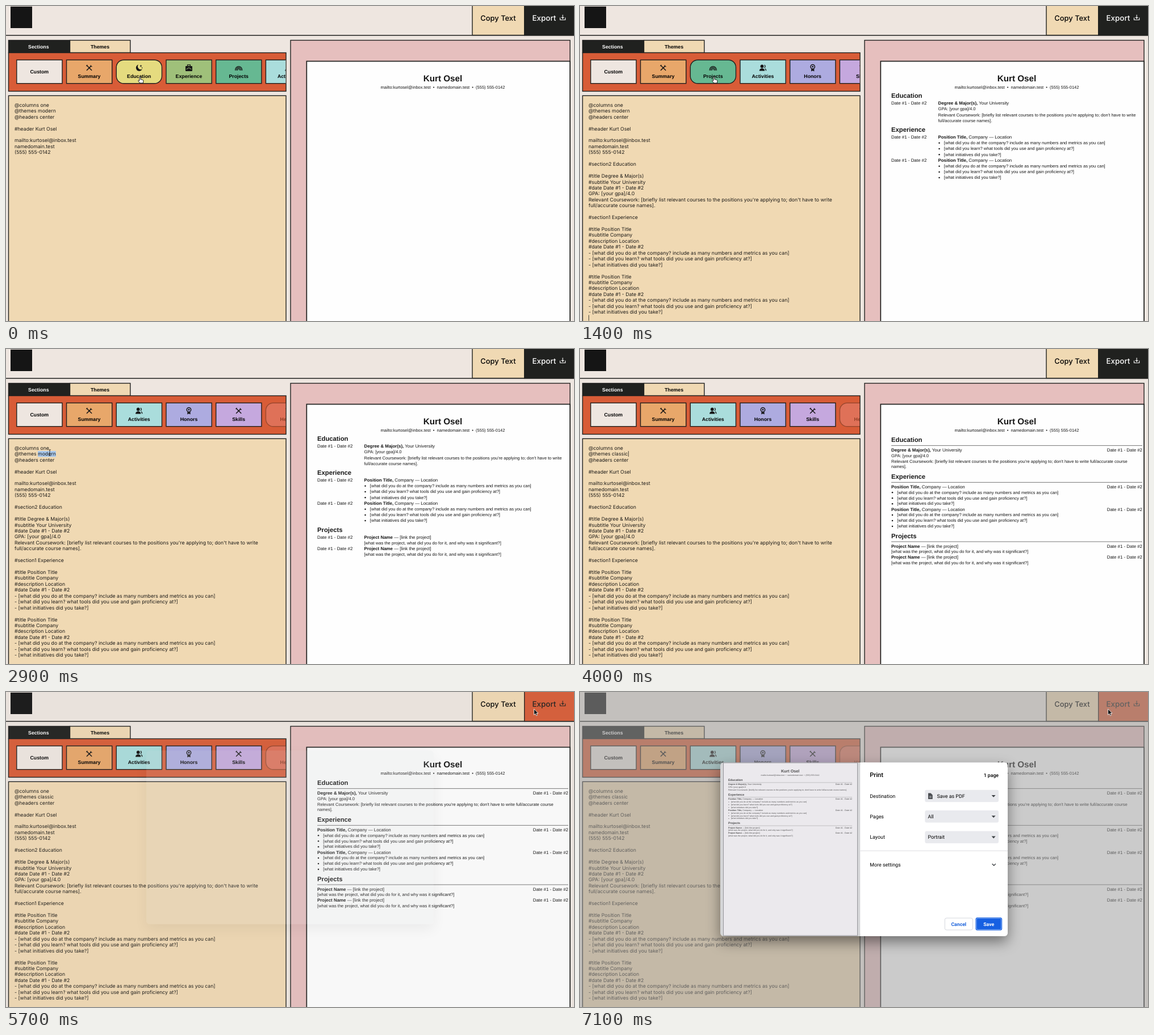
These frames come from a looping animation (1000 by 556 pixels, 7.2 s). An HTML page:

```html
<!DOCTYPE html>
<html lang="en">
<head>
<meta charset="utf-8">
<title>Resume builder</title>
<style>
html, body { margin: 0; width: 100%; height: 100%; overflow: hidden; background: #eee6e0; }
svg { display: block; width: 100vw; height: 100vh; }
text { text-rendering: geometricPrecision; white-space: pre; }
.sans { font-family: "Liberation Sans", Arial, sans-serif; }
.code { font-family: Inter, sans-serif; }
.ui { font-family: Roboto, sans-serif; }
.b { font-weight: 700; }
.m { font-weight: 500; }
</style>
</head>
<body>
<svg viewBox="0 0 1000 556" preserveAspectRatio="none">
  <defs>
    <clipPath id="barClip"><rect x="5" y="83" width="487.5" height="67"/></clipPath>
    <filter id="shadow" x="-20%" y="-20%" width="140%" height="150%">
      <feDropShadow dx="0" dy="10" stdDeviation="12" flood-opacity=".45"/>
    </filter>
  </defs>
  <g id="frame"></g>
  <g id="exportBtn"></g>
  <g id="cards" clip-path="url(#barClip)"></g>
  <g id="editor"></g>
  <g id="page"></g>
  <g id="dim"></g>
  <g id="dialog"></g>
  <g id="cursor"></g>
</svg>
<script>
const LOOP = 7200;
const INK = '#20211f', SAND = '#f0d9b3', ORANGE = '#d85c37', CREAM = '#eee6e0';
const NAME = 'Kurt Osel', MAIL = 'mailto:kurtosel@inbox.test', SITE = 'namedomain.test', PHONE = '(555) 555-0142';

// Moments of the story, in ms
const ADD = { Education: 600, Experience: 1150, Projects: 1750 };
const SELECT = 2700, TYPE = 3050, KEY = 100, CLICK = 5600, OPTIONS = 6300, PREVIEW = 6700;

const layers = {};
function put(id, html) {
  if (layers[id] === html) return;
  layers[id] = html;
  document.getElementById(id).innerHTML = html;
}

// y is the middle of the capitals
const text = (x, y, s, size, cls = 'sans', attrs = '') =>
  `<text x="${x}" y="${(y + size * .355).toFixed(2)}" font-size="${size}" class="${cls}" ${attrs}>${s.replace(/&/g, '&amp;')}</text>`;
const rect = (x, y, w, h, fill, attrs = '') =>
  `<rect x="${x}" y="${y}" width="${w}" height="${h}" fill="${fill}" ${attrs}/>`;
const path = (d, attrs = '') => `<path d="${d}" ${attrs}/>`;
const MID = 'text-anchor="middle"', END = 'text-anchor="end"';
const LINE = `stroke="${INK}" stroke-width="1.4"`;
const stroke = (color, w) => `fill="none" stroke="${color}" stroke-width="${w}"`;

const pen = document.createElement('canvas').getContext('2d');
function codeWidth(s) {
  pen.font = '100px Inter, sans-serif';
  return pen.measureText(s).width / 100 * CODE;
}

put('frame',
  rect(0, 0, 1000, 556, CREAM) +
  rect(8, 1, 38, 38, '#151515') +
  rect(821, -2, 92, 53.5, SAND, LINE) +
  path('M0 51.7H1000', LINE) +
  text(866.5, 21.5, 'Copy Text', 12.9, 'code m', MID) +
  rect(4.5, 60.5, 108, 22, INK, LINE) + text(57.3, 71.5, 'Sections', 8.75, 'sans b', MID + ' fill="#fff"') +
  rect(112.5, 60.5, 106.3, 22, SAND, LINE) + text(165.5, 71.5, 'Themes', 8.75, 'sans b', MID) +
  rect(4.5, 82.5, 488.5, 68, ORANGE, LINE) +
  rect(4.5, 158.3, 488.5, 420, SAND, LINE) +
  rect(501, 60.5, 492, 520, '#e6bfbe', LINE) +
  rect(529.3, 97.5, 463.7, 480, '#fefefe', `stroke="${INK}" stroke-width="1.7"`));

function drawExport(hover) {
  const ink = hover ? INK : '#fff';
  put('exportBtn', rect(912.7, -2, 90, 53.7, hover ? ORANGE : INK, LINE) +
    text(926.5, 21.5, 'Export', 13.4, 'code m', `fill="${ink}"`) +
    path('M975.5 20.5v4h9.2v-4M980.1 15.5v6.5m-2.2-2.2 2.2 2.2 2.2-2.2', stroke(ink, 1.1)));
}

const fillInk = 'fill="#161616"', ink = w => stroke('#161616', w);
const ICON = {
  tools: path('M-4-4 4.6 4.6M3.6-3.6-4.6 4.6', ink(1.5)) + path('M-5.2-3.2l2-2M2.4-4.6l.8 1.8 1.9.6', ink(1.3)),
  moon: path('M-1.2-5.6A5.7 5.7 0 1 0 5.6 2 5.2 5.2 0 0 1-1.2-5.6Z', fillInk) +
    path('M3.2-5.6l.6 1.6 1.6.6-1.6.6-.6 1.6-.6-1.6-1.6-.6 1.6-.6ZM5.4-1.4l.4.9.9.4-.9.4-.4.9-.4-.9-.9-.4.9-.4Z', fillInk),
  bag: rect(-6, -3.2, 12, 9, '#161616', 'rx="1"') + path('M-2.4-3.2v-2.2h4.8v2.2', ink(1.3)) + path('M-4.5 2.4 0-.2l4.5 2.6', stroke('#9fc07a', 1)),
  bow: [6, 4, 2].map(r => path(`M${-r} 4.5V3.5a${r} ${r} 0 0 1 ${2 * r} 0v1`, ink(1.3))).join(''),
  people: `<circle cx="-1.5" cy="-2.8" r="2.9" ${fillInk}/>` + path('M-6.2 5.4c0-6 9.4-6 9.4 0z', fillInk) +
    path('M2.6-5a2.5 2.5 0 0 1 0 4.6M3.6 1.4q2 .8 2 3.6', ink(1.3)),
  medal: `<circle cy="-2" r="3.7" ${ink(1.5)}/><circle cy="-2" r="1.4" ${fillInk}/>` + path('M-2.6 1.6V6.2L0 4.9l2.6 1.3V1.6L0 2.6Z', fillInk)
};
const CARDS = [
  ['Custom', CREAM], ['Summary', '#e8a76a', 'tools'], ['Education', '#e5db7f', 'moon'],
  ['Experience', '#9fc07a', 'bag'], ['Projects', '#66b892', 'bow'], ['Activities', '#aadddc', 'people'],
  ['Honors', '#adabe0', 'medal'], ['Skills', '#c5a8de', 'tools'], ['Header', '#f0a0a0', 'tools']
];
const cardX = i => 18.8 + i * 87.72;

function cardAt(x, y) {
  if (y < 95 || y > 137 || x > 493) return -1;
  const i = Math.floor((x - 18.8) / 87.72);
  return i >= 0 && x < cardX(i) + 80 ? i : -1;
}

function drawCards(t, hover) {
  const list = CARDS.filter(c => !(t >= ADD[c[0]]));
  put('cards', list.slice(0, 6).map(([label, fill, icon], i) => {
    const x = cardX(i), off = label === 'Header';
    const round = off || hover === i ? 'rx="13"' : '';
    return `<g ${off ? 'opacity=".32"' : ''}>` + rect(x, 95.2, 80.2, 41.5, fill, `${round} ${LINE}`) +
      (icon ? `<g transform="translate(${x + 40} 109.2)">${ICON[icon]}</g>` : '') +
      text(x + 40, icon ? 124.3 : 115.8, label, 8.75, 'sans b', MID) + '</g>';
  }).join(''));
}

const CODE = 8.69, ROW = 10.44, TOP = 174.7;
const duties = ['what did you do at the company? include as many numbers and metrics as you can',
  'what did you learn? what tools did you use and gain proficiency at?', 'what initiatives did you take?'].map(s => `[${s}]`);
const course = "Relevant Coursework: [briefly list relevant courses to the positions you're applying to; don't have to write full/accurate course names].";
const breakAt = (s, word) => { const i = s.indexOf(word); return [s.slice(0, i - 1), s.slice(i)]; };
const job = ['#title Position Title', '#subtitle Company', '#description Location', '#date Date #1 - Date #2', ...duties.map(s => '- ' + s)];

function drawEditor(t) {
  const typed = Math.floor((t - TYPE) / KEY) + 1;
  const theme = typed > 0 ? 'classic'.slice(0, typed) : 'modern';
  const rows = ['@columns one', '@themes ' + theme, '@headers center', '', '#header ' + NAME, '', MAIL, SITE, PHONE];
  if (t >= ADD.Education) rows.push('', '#section2 Education', '', '#title Degree & Major(s)', '#subtitle Your University',
    '#date Date #1 - Date #2', 'GPA: [your gpa]/4.0', ...breakAt(course, 'full/'));
  if (t >= ADD.Experience) rows.push('', '#section1 Experience', '', ...job, '', ...job);

  let html = '';
  if (t >= SELECT && typed <= 0)
    html += rect(15 + codeWidth('@themes '), TOP + ROW - 5.2, codeWidth(theme), ROW, '#a9c8ec');
  html += rows.map((s, i) => s && text(15, TOP + i * ROW, s, CODE, 'code', 'fill="#1c1a17"')).join('');

  let caret = null;
  if (t >= ADD.Education && t < ADD.Projects) caret = [15, rows.length];
  if (typed > 0 && (t < 4300 || (t > 4800 && t < 5300))) caret = [15.5 + codeWidth('@themes ' + theme), 1];
  if (caret) html += rect(caret[0], TOP + caret[1] * ROW - 5, .8, 10, INK);
  put('editor', html);
}

// Resume text: '*' bold lead-in with a date, '-' bullet
const jobLines = ['*Position Title,| Company — Location', ...duties.map(s => '-' + s)];
const projectLines = ['*Project Name| — [link the project]', '[what was the project, what did you do for it, and why was it significant?]'];
const SECTIONS = {
  Education: ['*Degree & Major(s),| Your University', 'GPA: [your gpa]/4.0', course],
  Experience: [...jobLines, ...jobLines],
  Projects: [...projectLines, ...projectLines]
};
const STYLE = {
  modern: { x: 630.5, head: 30.5, first: 13, pitch: 10.22, gap: 16, wrap: 'full/' },
  classic: { x: 548, head: 32, first: 18, pitch: 9.93, gap: 17.2, wrap: 'names]', right: 990 },
  print: { x: 548, head: 33, first: 17.2, pitch: 10.4, gap: 17, right: 1012 }
};

function resume(kind, names) {
  const st = STYLE[kind], mid = st.right ? (548 + st.right) / 2 : 769;
  let y = 128 + st.head;
  let html = text(mid, 128, NAME, 15.25, 'sans b', MID) +
    text(mid, 143.3, `${MAIL}  •  ${SITE}  •  ${PHONE}`, 7.5, 'sans', MID);
  for (const name of names) {
    html += text(548, y, name, 11.25, 'sans b');
    if (st.right) html += path(`M548 ${y + 10.4}H${st.right}`, stroke('#555', .8));
    y += st.first;
    const lines = SECTIONS[name].flatMap(s => s === course && st.wrap ? breakAt(s, st.wrap) : [s]);
    for (const s of lines) {
      if (s[0] === '*') {
        const [bold, rest] = s.slice(1).split('|');
        html += text(st.x, y, `<tspan font-weight="700">${bold}</tspan>${rest}`, 7.9) +
          (st.right ? text(st.right, y, 'Date #1 - Date #2', 7.9, 'sans', END) : text(548, y, 'Date #1 - Date #2', 7.9));
      } else if (s[0] === '-') {
        html += `<circle cx="${st.x + 2}" cy="${y + .4}" r="1.25"/>` + text(st.x + 10.3, y, s.slice(1), 7.58);
      } else html += text(st.x, y, s, 7.58);
      y += st.pitch;
    }
    y += st.gap - st.pitch;
  }
  return `<g fill="#161616">${html}</g>`;
}

function drawPage(t) {
  const kind = t >= TYPE + 6 * KEY ? 'classic' : 'modern';
  put('page', resume(kind, Object.keys(ADD).filter(k => t >= ADD[k])));
}

function select(y, label, value, x = 612.5) {
  return text(510.3, y, label, 8.9, 'ui') + rect(607.3, y - 10.8, 129.7, 21.6, '#e9eaee', 'rx="3"') +
    text(x, y, value, 8.9, 'ui') + path(`M724.6 ${y - 1.6}h7l-3.5 3.8z`, 'fill="#3c4043"');
}
const options = rect(493.5, 124.5, 259.5, 306.5, '#fff', 'rx="6"') + rect(493.5, 124.5, 10, 306.5, '#fff') +
  text(510.3, 146.2, 'Print', 11, 'ui m') + text(737, 146.5, '1 page', 8.7, 'ui m', END) +
  select(183.5, 'Destination', 'Save as PDF', 628.5) + select(219.8, 'Pages', 'All') + select(256.2, 'Layout', 'Portrait') +
  path('M613 178.5h4.5l3.2 3.2v7.3h-7.7z', 'fill="#4a4d51"') + path('M614.8 184.2h4m-4 2h4', stroke('#e9eaee', .7)) +
  path('M493.5 280.3H753', stroke('#dcdde0', 1)) +
  text(510.3, 304.8, 'More settings', 8.9, 'ui') + path('M725.6 303.2l3.1 3.1 3.1-3.1', stroke('#3c4043', 1.3)) +
  rect(642.3, 399, 49, 21, '#fff', 'rx="3" stroke="#d5d8de"') + text(666.8, 409.5, 'Cancel', 8.7, 'ui b', MID + ' fill="#1a62dc"') +
  rect(696.4, 398, 46.8, 22.8, '#1660e2', 'rx="3.5"') + rect(697.8, 399.4, 44, 20, 'none', 'rx="2.5" stroke="#a9c6f5" stroke-width=".8"') +
  text(719.7, 409.5, 'Save', 8.7, 'ui b', MID + ' fill="#fff"');
const sheet = rect(252.5, 125, 236, 305, '#ebe9ed', 'stroke="#8f8f93" stroke-width=".9"') +
  `<g opacity=".75" transform="translate(261 139.5) scale(.47) translate(-548 -128)">${resume('print', Object.keys(ADD))}</g>`;

function drawDialog(t) {
  if (t < CLICK) { put('dim', ''); put('dialog', ''); return; }
  const p = Math.min(1, (t - CLICK) / 300), e = p * p;
  put('dim', rect(0, 0, 1000, 556, '#9e9e9e', `opacity="${(e * .52).toFixed(3)}"`));
  put('dialog', `<g opacity="${e.toFixed(3)}" transform="translate(0 ${(-24 * (1 - e)).toFixed(2)})">` +
    rect(247, 124.5, 506, 306.5, '#d5d6d8', 'rx="6" filter="url(#shadow)"') +
    (t >= OPTIONS ? options : '') + (t >= PREVIEW ? sheet : '') + '</g>');
}

const POINTERS = {
  arrow: path('M0 0V10.4L2.5 8.2 4 11.8 5.9 11 4.4 7.5H7.6Z', 'fill="#111" stroke="#fff" stroke-width=".8"'),
  hand: path('M-1 1q0-1.2 1-1.2t1 1.2V4.6l3.6.7q1.4.3 1.3 1.7L5.4 11H-.4L-3.4 6.8q.6-1.5 2.4 0Z', 'fill="#fff" stroke="#111" stroke-width=".9"'),
  beam: path('M-1.8-5.5Q0-5.5 0-4.2V4.2Q0 5.5-1.8 5.5M1.8-5.5Q0-5.5 0-4.2M0 4.2Q0 5.5 1.8 5.5', stroke('#222', .9))
};
// time, x, y
const TRACK = [[0, 236, 125], [2000, 236, 125], [2550, 77, 183], [4500, 77, 183], [5300, 929.5, 30], [LOOP, 929.5, 30]];

function pointer(t) {
  const i = TRACK.findIndex((k, n) => n && t < k[0]);
  const [t0, x0, y0] = TRACK[i - 1], [t1, x1, y1] = TRACK[i];
  const p = (t - t0) / (t1 - t0), e = p * p * (3 - 2 * p);
  return [x0 + (x1 - x0) * e, y0 + (y1 - y0) * e];
}

function render(t) {
  const [x, y] = pointer(t);
  const hover = cardAt(x, y);
  const hidden = t >= TYPE && t < 4450;
  const shape = hover >= 0 ? 'hand' : y > 158 && x < 493 ? 'beam' : 'arrow';
  drawExport(x > 912 && y < 52);
  drawCards(t, hover);
  drawEditor(t);
  drawPage(t);
  drawDialog(t);
  put('cursor', hidden ? '' : `<g transform="translate(${x.toFixed(1)} ${y.toFixed(1)})">${POINTERS[shape]}</g>`);
}

const start = performance.now();
function tick() {
  render((performance.now() - start) % LOOP);
  requestAnimationFrame(tick);
}
tick();
</script>
</body>
</html>
```
